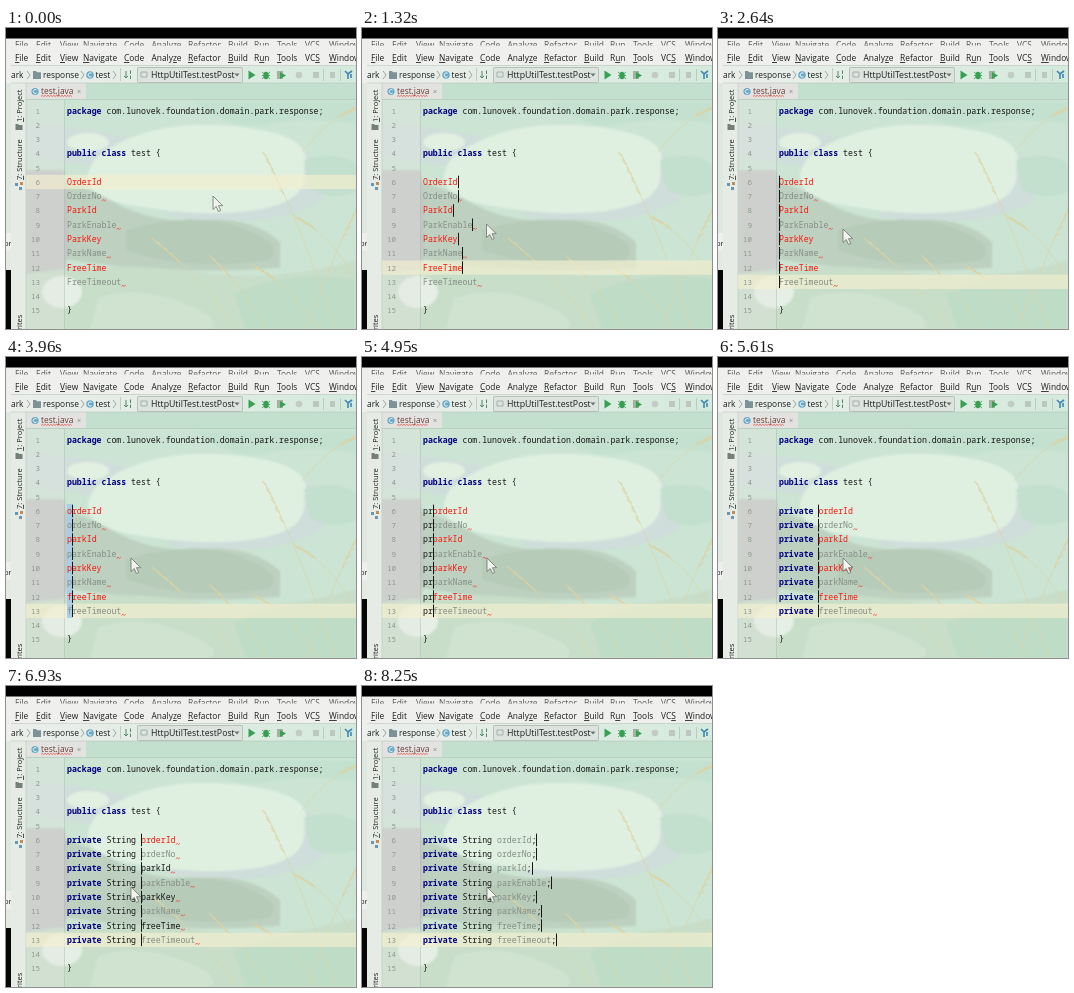
Write an HTML page that moves like this. It is 350 px wide and 301 px high and loops after 8580 ms.

```html
<!DOCTYPE html>
<html lang="en">
<head>
<meta charset="utf-8">
<title>Multi-caret editing</title>
<style>
html, body { margin: 0; width: 100%; height: 100%; overflow: hidden; background: #000; }
svg { display: block; width: 350px; height: 301px; }
text { white-space: pre; }
.ui { font: 8.4px "Open Sans", "Noto Sans", sans-serif; fill: #1c201d; }
.small { font-size: 7.5px; }
.wide { font-size: 8.75px; }
.code { font: 8.22px "Noto Sans Mono", monospace; fill: #151515; }
.kw { font-weight: bold; fill: #000080; }
.num { fill: #8f988e; text-anchor: end; font-size: 7.6px; }
.u { text-decoration: underline; text-decoration-thickness: .6px; }
</style>
</head>
<body>
<svg viewBox="0 0 350 301">
  <defs>
    <clipPath id="win"><path d="M5 18H350V301H5z"/></clipPath>
    <clipPath id="back"><path d="M0 10H350V17.500H0z"/></clipPath>
    <filter id="soft"><feGaussianBlur stdDeviation=".9"/></filter>
    <linearGradient id="barFill">
      <stop offset="0" stop-color="#ebeeeb"/>
      <stop offset=".6" stop-color="#dfece3"/>
      <stop offset="1" stop-color="#d3eadc"/>
    </linearGradient>
  </defs>

  <path d="M0 10H350V301H0z" fill="#efefee"/>
  <path d="M0 55H5V205H0z" fill="#dfe8de"/>
  <path d="M0 223H5V242H0z" fill="#e4e9e2"/>
  <path d="M0 242H5V301H0z" fill="#050605"/>
  <text class="ui small" x="-2" y="218">pr</text>
  <g id="menuBack" clip-path="url(#back)" opacity=".75"></g>

  <g clip-path="url(#win)">
    <path d="M5 18H350V37.500H5z" fill="#efefee"/>
    <path d="M5 37.500H350V55H5z" fill="url(#barFill)"/>
    <path d="M5 55H350V301H5z" fill="#cce4d3"/>
    <path d="M20 55H350V71.500H20z" fill="#c3e0cf"/>
    <g filter="url(#soft)">
      <path d="M20 96Q80 98 130 112T200 122L180 148Q110 144 20 128z" fill="#d0dedb"/>
      <path d="M236 102Q270 104 300 124T316 172Q262 204 160 188z" fill="#cfdddb"/>
      <path d="M190 74H350V96Q300 88 262 96T190 74z" fill="#c4e1cf"/>
      <path d="M90 130Q140 90 226 98T298 140Q304 174 250 182T130 178Q62 168 90 130z" fill="#dff0e1"/>
      <ellipse cx="82" cy="114" rx="21" ry="9" fill="#e1f0e1"/>
      <path d="M298 132Q330 122 350 136V164Q322 174 304 160z" fill="#c3dfcd"/>
      <path d="M20 148Q70 152 108 174T196 192T274 214V240Q180 246 110 238T20 222z" fill="#bed1c0"/>
      <path d="M120 202Q190 182 236 200T262 232Q180 244 120 222z" fill="#b7cbb9"/>
      <path d="M20 142H58Q68 200 58 246H20z" fill="#c2c7c4"/>
      <path d="M20 246Q110 232 190 244T350 232V301H20z" fill="#c8dec9"/>
      <path d="M228 266Q286 240 350 252V301H240z" fill="#bfdcc6"/>
      <path d="M92 270Q132 256 176 274T204 301H84z" fill="#cfe3d0"/>
      <ellipse cx="56" cy="264" rx="20" ry="16" fill="#e5efe5"/>
    </g>
    <g id="grass" fill="none" stroke="#dcd3a3" stroke-linecap="round"></g>
    <path d="M5 55H20V301H5z" fill="#efefeb" opacity=".75"/>
    <path d="M20 72H58V301H20z" fill="#e3e4e2" opacity=".3"/>
    <path d="M20 55H80V71H20z" fill="#e2e2e0"/>
    <path d="M5 37.500H350M5 55H350M20 71.500H350M20 55V301M58.500 72V301" fill="none" stroke="#aebaaf" stroke-width=".6" opacity=".8"/>
    <rect id="row" x="20" width="330" height="14.3" fill="#f5f0d0" opacity=".65"/>

    <g id="menu"></g>
    <g>
      <text class="ui" x="5" y="50">ark</text>
      <text class="ui" x="37" y="50">response</text>
      <text class="ui" x="89.500" y="50">test</text>
      <path d="M21 43l3 4-3 4M75 43l3 4-3 4M107 43l3 4-3 4" fill="none" stroke="#8c968a" stroke-width=".8"/>
      <path d="M27 43h3l1 1.200h4V51H27z" fill="#7d9297"/>
      <circle cx="84" cy="47" r="3.800" fill="#6aa9c6"/>
      <path d="M85.600 45.400a2.100 2.100 0 1 0 0 3.200" fill="none" stroke="#fff" stroke-width=".9"/>
      <path d="M114.500 40V53M317.500 41V53M334.500 41V53" stroke="#b3bdae" stroke-width=".7"/>
      <path d="M120 43v7M118 48l2 2 2-2M124.500 42.500v3.500M124.500 47.500v3.500" fill="none" stroke="#4f8a62"/>
      <rect x="131.500" y="39.500" width="105" height="15" rx="1" fill="#dde4df" stroke="#a5b0a6" stroke-width=".7"/>
      <path d="M135 44h6v5h-6z" fill="none" stroke="#a2b0ac"/>
      <text class="ui wide" x="145" y="50">HttpUtilTest.testPost</text>
      <path d="M228.500 45.500h5l-2.500 3z" fill="#6a726b"/>
      <path d="M242.500 42.500l7 4.500-7 4.500z" fill="#37a052"/>
      <ellipse cx="260" cy="47.500" rx="2.700" ry="3.800" fill="#37a052"/>
      <path d="M256 44l8 7M264 44l-8 7M256 47.500h8" stroke="#37a052" stroke-width=".8"/>
      <path d="M271 43h6v8h-6z" fill="#a3b19f"/>
      <path d="M274 44l6 3.500-6 3.500z" fill="#37a052"/>
      <circle cx="293" cy="47" r="3.300" fill="#c2ccc4"/>
      <path d="M307 44h6v6h-6zM324 44h5v6h-5z" fill="#bcc7bf"/>
      <path d="M339 43l3 3 4-3M342 46v5M345 46v4" fill="none" stroke="#3f86b5" stroke-width="1.600"/>
    </g>

    <circle cx="29" cy="63.500" r="3.600" fill="#6aa9c6"/>
    <path d="M30.600 62a2 2 0 1 0 0 3" fill="none" stroke="#fff" stroke-width=".8"/>
    <text class="ui" x="35" y="66" style="fill:#6b4038">test.java</text>
    <path id="tabWave" fill="none" stroke="#e33a30" stroke-width=".7"/>
    <path d="M71.500 62l3 3m0-3l-3 3" stroke="#858e83" stroke-width=".7"/>
    <g class="ui small">
      <text transform="translate(16 94) rotate(-90)"><tspan class="u">1</tspan>: Project</text>
      <text transform="translate(16 152) rotate(-90)"><tspan class="u">7</tspan>: Structure</text>
      <text transform="translate(16 302) rotate(-90)">rites</text>
    </g>
    <path d="M9.500 96h3v1h4v5h-7z" fill="#747f79"/>
    <path d="M9 155h3v3H9zM13 159h3v3h-3z" fill="#6a96ae"/>
    <path d="M14 154h3v3h-3z" fill="#c38c55"/>

    <g id="lines" class="code"></g>
    <g id="edit" class="code"></g>
    <path id="waves" fill="none" stroke="#ee3b2f" stroke-width=".75"/>
    <path id="carets" fill="none" stroke="#161616" stroke-width="1"/>
  </g>
  <path id="mouse" d="M0 0V13.500L3.200 10.500 5.500 15.500 7.700 14.500 5.500 9.700H9.700z" fill="#f0f3ee" stroke="#6c726d" stroke-width=".8" stroke-linejoin="round"/>
  <path d="M0 0H350V10.500H0z" fill="#000"/>
</svg>
<script>
const STEP = 330, COUNT = 26;
const LEFT = 61, CW = 4.932, TOP = 82.6, PITCH = 14.27, FIRST = 6;
const RED = '#f5170f', GRAY = '#858d84', DARK = '#151515';
const NAMES = 'OrderId OrderNo ParkId ParkEnable ParkKey ParkName FreeTime FreeTimeout'.split(' ');
const $ = id => document.getElementById(id);
const rowY = n => TOP + (n - 1) * PITCH;
const colX = c => LEFT + c * CW;

function text(col, n, str, fill, cls = '') {
  const color = fill ? ` style="fill:${fill}"` : '';
  return `<text class="${cls}" x="${colX(col)}" y="${rowY(n) + 3}"${color}>${str}</text>`;
}

function wave(x, y, w) {
  let d = `M${x} ${y}`;
  for (let i = 1; i * 1.4 <= w; i++) d += `L${x + i * 1.4} ${y - i % 2 * 1.2}`;
  return d;
}

// Underscore marks the mnemonic letter.
const MENU = [[9, '_File'], [30, '_Edit'], [54, '_View'], [77, '_Navigate'], [118, '_Code'],
  [145.5, 'Analy_ze'], [182, '_Refactor'], [222, '_Build'], [248, 'R_un'],
  [271, '_Tools'], [299, 'VC_S'], [323, '_Window']];
const menu = y => MENU.map(([x, s]) =>
  `<text class="ui" x="${x}" y="${y}">${s.replace(/_(.)/, '<tspan class="u">$1</tspan>')}</text>`).join('');

// Each stem: root x, root y, bend x, bend y, tip x, tip y.
const STEMS = [[330, 301, 292, 190, 259, 126], [232, 301, 196, 250, 148, 212],
  [262, 301, 240, 262, 206, 230], [345, 246, 325, 206, 290, 190],
  [300, 301, 326, 230, 350, 182], [296, 124, 322, 90, 350, 81], [312, 301, 284, 256, 250, 240]];

function stem([x, y, bx, by, tx, ty]) {
  let out = `<path d="M${x} ${y}Q${bx} ${by} ${tx} ${ty}" stroke-width=".8" opacity=".75"/>`;
  for (let i = 0; i < 9; i++) {
    const t = 0.72 + i * 0.033, s = 1 - t;
    const px = s * s * x + 2 * s * t * bx + t * t * tx;
    const py = s * s * y + 2 * s * t * by + t * t * ty;
    const dx = Math.sign(tx - x) * 2.5, side = i % 2 ? 1 : -1;
    out += `<path d="M${px} ${py}l${dx + side} ${-2.5 + side}" stroke-width="1.5" opacity=".7"/>`;
  }
  return out;
}

function setup() {
  $('menuBack').innerHTML = menu(19.5);
  $('menu').innerHTML = menu(33);
  $('grass').innerHTML = STEMS.map(stem).join('');
  $('tabWave').setAttribute('d', wave(35, 68.5, 32));
  let out = '';
  for (let n = 1; n <= 15; n++) {
    out += `<text class="num" x="34" y="${rowY(n) + 3}">${n}</text>`;
  }
  out += text(0, 1, 'package', '', 'kw') +
    text(8, 1, 'com.lunovek.foundation.domain.park.response;') +
    text(0, 4, 'public class', '', 'kw') + text(13, 4, 'test {') + text(0, 15, '}');
  $('lines').innerHTML = out;
}

const TYPED = ['p', 'pr', 'privat', 'private ', 'private S', 'private Stri', 'private String', 'private String '];
const MOVES = [[207, 168], [150, 158], [118, 172], [122, 186], [124.5, 196]];

function nameColor(i, k) {
  if (i % 2 || k >= 22) return GRAY;
  return k < 21 || i === 0 ? RED : DARK;
}

function prefix(str, n) {
  if (!str.startsWith('private ')) return text(0, n, str);
  return text(0, n, 'private', '', 'kw') + text(8, n, str.slice(8));
}

function draw(k) {
  const typed = k < 14 ? '' : TYPED[Math.min(k - 14, 7)];
  const semi = k >= 24;
  const shown = k < 1 ? 0 : Math.min(8, 2 * k - 1);
  const picked = k >= 10 && k <= 12;
  const atEnd = k < 8 || k >= 22;
  let out = '', carets = '', waves = '';

  NAMES.forEach((raw, i) => {
    const n = FIRST + i, y = rowY(n), at = typed.length;
    const name = k < 12 ? raw : raw[0].toLowerCase() + raw.slice(1);
    const end = at + name.length + (semi ? 1 : 0);
    if (picked) out += `<rect x="${LEFT}" y="${y - 7}" width="${CW}" height="14" fill="#a9cde9"/>`;
    if (typed) out += prefix(typed, n);
    out += text(at, n, name, nameColor(i, k));
    if (semi) out += text(end - 1, n, ';');
    else if (i % 2 || k >= 21) waves += wave(colX(end) + .3, y + 4.6, 4.3);
    if (i < shown) {
      const col = atEnd ? end : picked ? 1 : at;
      carets += `M${Math.round(colX(col)) + .5} ${y - 6.3}v12.6`;
    }
  });
  $('edit').innerHTML = out;
  $('carets').setAttribute('d', carets);
  $('waves').setAttribute('d', waves);

  const line = FIRST + Math.max(0, shown - 1);
  $('row').setAttribute('y', rowY(line) - 7.1);
  const [x, y] = MOVES[k] || [125, 201];
  $('mouse').setAttribute('transform', `translate(${x} ${y})`);
}

let last = -1;
function tick(now) {
  const k = Math.floor(now / STEP) % COUNT;
  if (k !== last) draw(last = k);
  requestAnimationFrame(tick);
}

setup();
draw(0);
requestAnimationFrame(tick);
</script>
</body>
</html>
```
